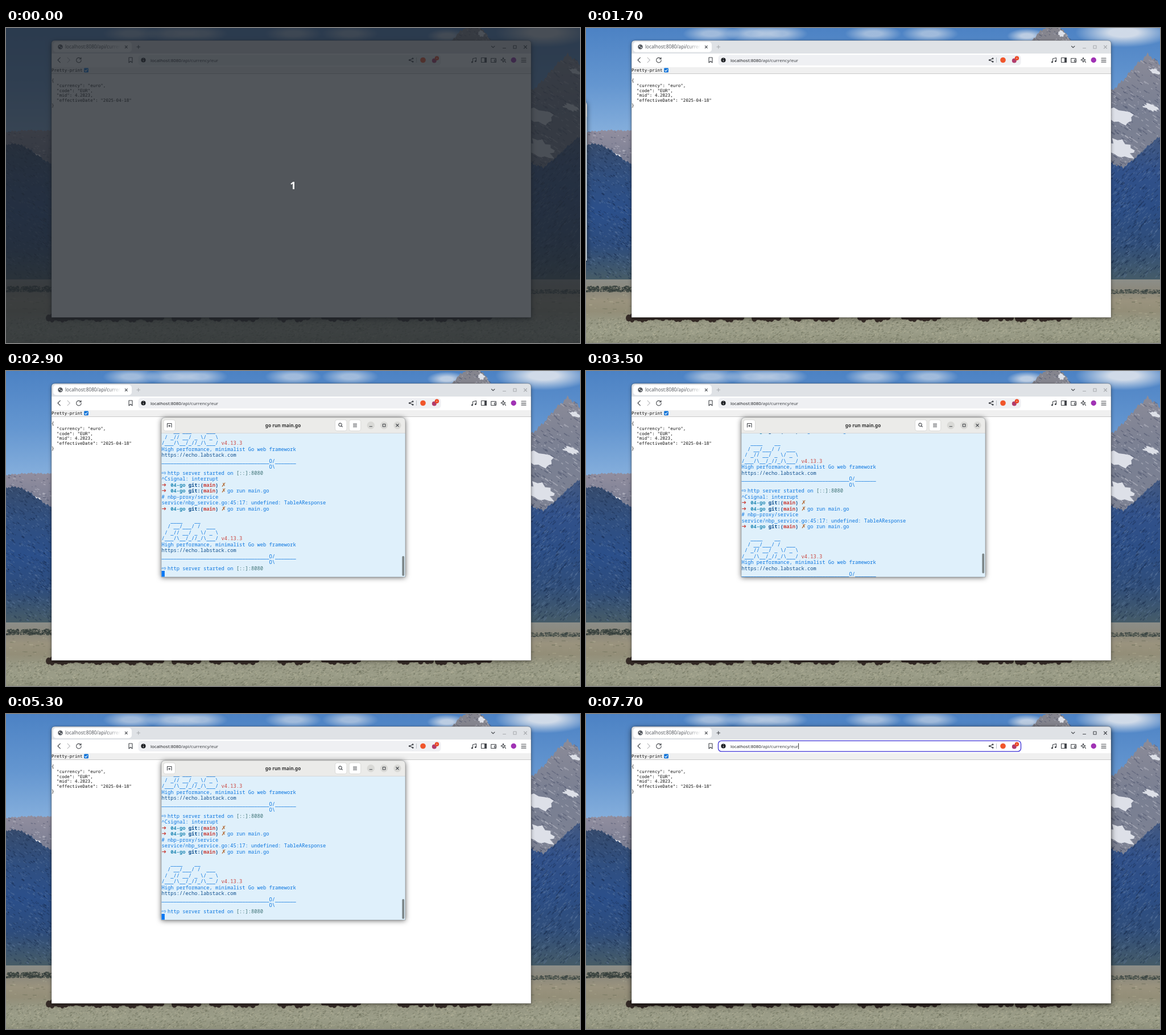
An HTML page with a canvas for the animation above (8000 ms loop, 1009 by 555 pixels).

```html
<!DOCTYPE html>
<html lang="en">
<head>
<meta charset="utf-8">
<title>Currency API demo</title>
<style>
html, body { margin: 0; width: 100%; height: 100%; overflow: hidden; background: #5a8cc9; }
canvas, svg { position: absolute; left: 0; top: 0; }
text { white-space: pre; }
.ui { font: 7.95px "Noto Sans", "Open Sans", sans-serif; }
.big { font-size: 8.2px; }
.json { font: 7.55px "DejaVu Sans Mono", monospace; fill: #111; }
.line path { fill: none; stroke: #44474c; stroke-width: 1.1; stroke-linecap: round; stroke-linejoin: round; }
#rows text { font: 8.75px "Noto Sans Mono", "DejaVu Sans Mono", monospace; fill: #0b76e0; }
#rows .b { font-weight: 700; }
#rows .w { font: 10px "DejaVu Sans", sans-serif; }
#rows .r { fill: #c9403a; }
#rows .c { fill: #2288b4; }
#rows .n { fill: #0f4f8f; }
#rows .o { fill: #b0622a; }
#rows .g { fill: #3f7377; }
#rows .sel * { fill: #dff0fb; }
#idle { filter: drop-shadow(0 2px 3px rgba(0,0,0,.4)); }
#lit { filter: drop-shadow(0 3px 6px rgba(0,0,0,.4)); }
#frame { filter: drop-shadow(0 1px 5px rgba(0,0,0,.6)); }
</style>
</head>
<body>
<canvas id="land" width="1009" height="555"></canvas>
<svg width="1009" height="555" viewBox="0 0 1009 555">
  <defs>
    <linearGradient id="fade" gradientUnits="userSpaceOnUse" x1="178" x2="202" y1="0" y2="0">
      <stop stop-color="#55595f"/><stop offset="1" stop-color="#55595f" stop-opacity="0"/>
    </linearGradient>
    <clipPath id="body"><rect y="28" width="429" height="253"/></clipPath>
    <path id="shell" d="M80 510V28q0-6 6-6H917q6 0 6 6V510z"/>
    <path id="pane" d="M0 281V7q0-7 7-7H422q7 0 7 7V281z"/>
  </defs>

  <use id="idle" href="#shell" fill="#dfe2e6"/>
  <use id="lit" href="#shell" fill="#dfe2e6"/>
  <rect x="80" y="45" width="843" height="465" fill="#fff"/>
  <rect x="83" y="24.5" width="138" height="18" rx="5" fill="#fff"/>
  <text class="ui big" x="104" y="36.3" fill="url(#fade)">localhost:8080/api/curren</text>
  <rect id="bar" x="232.5" y="47.3" width="532" height="18.7" rx="5.5" stroke-width="1.6"/>
  <rect id="mark" x="254" y="51" width="120" height="11" fill="#b5d1f7"/>
  <text class="ui" x="254" y="59.5" fill="#202226">localhost:8080<tspan fill="#3f4247">/api/currency/eur</tspan></text>
  <path id="caret" d="M373.6 51.5v10.300" stroke="#222" stroke-width=".9"/>
  <path d="M721.5 52v9" stroke="#bbbec4"/>
  <g id="icons" class="line"></g>
  <g id="controls" class="line"></g>
  <rect x="80" y="69" width="843" height="11.5" fill="#f0f0f0"/>
  <path d="M80 80.5h843" stroke="#c9c9c9"/>
  <text class="json" x="80" y="77">Pretty-print</text>
  <rect x="137.2" y="70.6" width="7.7" height="7.7" rx="1.3" fill="#0b72d8"/>
  <path d="M138.7 74.5l1.7 1.8 3-3.800" fill="none" stroke="#fff" stroke-width="1.1"/>
  <g id="json" class="json"></g>
  <use href="#shell" fill="none" stroke="#000" stroke-opacity=".28" stroke-width=".8"/>

  <g id="term">
    <use id="frame" href="#pane" fill="#dff0fb"/>
    <path d="M0 27.5V7q0-7 7-7H422q7 0 7 7V27.5z" fill="#ebebe9"/>
    <path d="M0 27.5h429" stroke="#d2d4d3" stroke-width=".8"/>
    <g id="buttons" class="line"></g>
    <text class="ui big" x="214" y="16.8" text-anchor="middle" fill="#333" font-weight="700" style="font-weight:700">go run main.go</text>
    <g clip-path="url(#body)">
      <g id="scroll">
        <path id="pick" fill="#00f"/>
        <g id="rows"></g>
        <rect id="block" x=".5" y="270" width="5.4" height="10.5" fill="#0878f4"/>
      </g>
    </g>
    <rect id="thumb" x="423.3" width="3.8" height="35" rx="1.8" fill="#7d8789"/>
    <use href="#pane" fill="none" stroke="#000" stroke-opacity=".3" stroke-width=".7"/>
  </g>

  <g id="count">
    <rect width="1009" height="555" fill="#22272d" fill-opacity=".78"/>
    <text x="504.5" y="283.9" text-anchor="middle" fill="#fff" style="font:600 18.5px 'Noto Sans',sans-serif">1</text>
  </g>
</svg>
<script>
const $ = id => document.getElementById(id);
const show = (id, on) => $(id).style.display = on ? '' : 'none';
const clamp = (v, lo, hi) => Math.min(hi, Math.max(lo, v));

// Landscape
const g = $('land').getContext('2d');
let seed = 7;
const rnd = () => (seed = seed * 16807 % 2147483647) / 2147483647;

function grad(y0, y1, ...colors) {
  const c = g.createLinearGradient(0, y0, 0, y1);
  colors.forEach((k, i) => c.addColorStop(i / (colors.length - 1), k));
  return c;
}
function band(y, h, fill) { g.fillStyle = fill; g.fillRect(0, y, 1009, h); }

function cloud(x, y, rx, ry, a) {
  g.save();
  g.translate(x, y);
  g.scale(rx, ry);
  const c = g.createRadialGradient(0, 0, .3, 0, 0, 1);
  c.addColorStop(0, `rgba(215,223,234,${a})`);
  c.addColorStop(1, 'rgba(215,223,234,0)');
  g.fillStyle = c;
  g.fillRect(-1, -1, 2, 2);
  g.restore();
}

// Ridge through evenly spaced heights, filled down to base; returns its height function
function range(x0, x1, heights, rough, base, fill) {
  const top = x => {
    const u = clamp((x - x0) / (x1 - x0), 0, .999) * (heights.length - 1), i = Math.floor(u);
    return heights[i] + (heights[i + 1] - heights[i]) * (u - i) + rough * (Math.sin(x * .4) + Math.sin(x * 1.1));
  };
  g.fillStyle = fill;
  for (let x = x0; x < x1; x++) g.fillRect(x, top(x), 1, base - top(x));
  return top;
}

// Short strokes between top(x) and bottom, leaning by slope
function specks(n, x0, x1, top, bottom, length, slope, ...colors) {
  for (let i = 0; i < n; i++) {
    const x = x0 + rnd() * (x1 - x0), y = top(x) + rnd() * (bottom - top(x)), d = 1 + rnd() * length;
    g.strokeStyle = colors[i % colors.length];
    g.lineWidth = 1 + rnd();
    g.beginPath();
    g.moveTo(x, y);
    g.lineTo(x + d, y + d * slope);
    g.stroke();
  }
}

function snow(x, y, rx, ry) {
  g.fillStyle = '#dde0e8';
  g.beginPath();
  for (let a = 0; a < 6.28; a += .3) {
    const r = .55 + rnd() * .5;
    g.lineTo(x + rx * r * Math.cos(a), y + ry * r * Math.sin(a) + rx * r * Math.cos(a) * .25);
  }
  g.fill();
}

function landscape() {
  const flat = y => () => y;
  const rockTones = ['rgba(205,206,216,.4)', 'rgba(62,70,98,.4)'];
  const treeTones = ['rgba(20,38,70,.35)', 'rgba(105,132,168,.3)'];
  const grassTones = ['rgba(192,190,162,.35)', 'rgba(88,92,72,.3)'];

  band(0, 555, grad(0, 200, '#4c82c4', '#6496d0', '#8bb3de'));
  for (const x of [220, 295, 340, 505, 605]) cloud(x, 10, 50, 15, .6);
  cloud(775, 14, 35, 13, .8);
  cloud(945, 8, 85, 26, .95);

  const peak = range(783, 851, [22, 7, -3, -4, 2, 22], 1, 23, '#85858e');
  specks(60, 783, 851, peak, 22, 4, .6, ...rockTones);
  snow(835, 10, 8, 6);

  const far = range(0, 80, [183, 180, 181], .7, 260, grad(180, 240, '#918e9f', '#797d92'));
  specks(90, 0, 80, far, 235, 4, .3, ...rockTones);
  snow(48, 223, 15, 5);
  const near = range(0, 80, [205, 204, 213, 228, 241], 1, 443, grad(205, 443, '#364b6d', '#304f80', '#2b4f8a', '#2d4c7c', '#475c66'));
  specks(600, 0, 80, near, 440, 4, .7, ...treeTones);

  const crag = range(922, 1009, [112, 92, 66, 46, 64], 1.500, 260, grad(45, 240, '#8b8b98', '#797f92', '#7d8293'));
  specks(260, 922, 1009, crag, 240, 7, .7, ...rockTones);
  for (const y of [156, 214]) snow(940, y, 30, 18);
  snow(999, 76, 12, 5);
  snow(992, 140, 15, 7);
  const slope = range(922, 1009, [238, 246, 229, 208, 190], 1, 443, grad(190, 443, '#425880', '#31518a', '#2c4e86', '#304e7a', '#455b68'));
  specks(650, 922, 1009, slope, 440, 5, -1, ...treeTones);

  band(443, 112, grad(443, 555, '#8c8e89', '#8b887c', '#9a937e', '#938e78', '#979884', '#9b9d88', '#8f917c'));
  specks(330, 0, 80, flat(455), 465, 3, 0, '#333c3a', '#48514a');
  specks(200, 922, 1009, flat(461), 468, 3, 0, '#3a4442', '#596057');
  specks(500, 0, 1009, flat(470), 510, 6, 0, ...grassTones);
  specks(3600, 0, 1009, flat(511), 555, 3, -.4, ...grassTones);

  // herd
  g.fillStyle = '#352b27';
  for (const [a, b] of [[72, 272], [293, 338], [359, 438], [479, 533], [556, 620], [690, 748], [756, 850]])
    for (let x = a; x < b; x += 6) {
      g.beginPath();
      g.ellipse(x + 3, 511, 5, 2 + rnd() * 6, 0, 0, 7);
      g.fill();
    }
}

// Icon pieces
const path = d => `<path d="${d}"/>`;
const cross = (x, y, r) => path(`M${x - r} ${y - r}l${2 * r} ${2 * r}m0 ${-2 * r}l${-2 * r} ${2 * r}`);
const dash = (x, y, w) => path(`M${x - w / 2} ${y}h${w}`);
const box = (x, y, w, h = w) => path(`M${x - w / 2} ${y - h / 2}h${w}v${h}h${-w}z`);
const side = (x, y, r) => path(`M${x - r / 2} ${y - Math.abs(r)}l${r} ${Math.abs(r)} ${-r} ${Math.abs(r)}`);
const menu = (x, y, w, gap) => [-gap, 0, gap].map(d => dash(x, y + d, w)).join('');
const dot = (x, y, r, fill = '#44474c') => `<circle cx="${x}" cy="${y}" r="${r}" fill="${fill}"/>`;
const key = x => `<rect x="${x - 10.3}" y="4" width="20.5" height="19.5" rx="3.5" fill="#fff" stroke="#cfcfcc" stroke-width=".7"/>`;

$('icons').innerHTML = [
  dot(95.5, 33.3, 4.2, '#55595f'), dot(94.2, 32.2, 1, '#fff'), dot(97, 34.5, 1, '#fff'),
  cross(211.3, 33.3, 2), path('M853.5 32l2.7 2.700 2.700-2.700'),
  side(93.2, 56.5, -4.3), `<g opacity=".35">${side(110.2, 56.5, 4.3)}</g>`,
  path('M131 53.7a4.300 4.300 0 1 0 1.200 3M132 52v2.700h-2.700'), path('M216 52h6v9l-3-2.500-3 2.500z'),
  dot(241.5, 56.5, 4.1, '#202226'), dot(241.5, 54.6, .5, '#fff'), dot(241.5, 57.6, .8, '#fff'),
  path('M715 53.800l-5.500 2.700 5.500 2.700'), dot(715, 53.7, 1.5), dot(709.3, 56.5, 1.5), dot(715, 59.3, 1.5),
  dot(733, 56.5, 4.8, '#f0562c'), dot(752.8, 57.5, 4, '#b03c6c'), dot(757.4, 53.3, 3.7, '#ec4a28'), dot(757.4, 53.3, .8, '#fff'),
  path('M820.5 60v-6l6-1.500v6'), dot(819.3, 60, 1.5), dot(825.3, 58.5, 1.5),
  box(840, 56.5, 9, 8), `<rect x="841" y="52.5" width="3.5" height="8" fill="#44474c"/>`,
  box(857, 57, 8.5, 7), box(860, 57.5, 3),
  path('M874 52l1 3 3 1.200-3 1.200-1 3-1-3-3-1.200 3-1.200zM876.500 58.500l2 2'),
  dot(892.3, 56.5, 4.7, '#a032b4'), menu(910, 56.6, 8, 3.3)
].join('');
$('controls').innerHTML = dash(232.8, 33.3, 5.6) + path('M232.8 30.500v5.600') + dash(876, 35.5, 5) + box(894.5, 33.5, 5) + cross(913, 33.5, 2.5);
$('buttons').innerHTML = [14.3, 315.8, 340.5].map(key).join('') + [368.3, 391.6, 415].map(x => dot(x, 13.7, 6.7, '#d9d9d6')).join('') +
  path('M10.500 17v-6.500h7.500V17') + dash(14.2, 14.8, 3) + path('M14.200 13.300v3') +
  path('M318.300 16.300l-1.800-1.800a2.700 2.700 0 1 0-.1 .1') + menu(340.5, 13.7, 6, 2.5) +
  dash(368.3, 15.8, 4.5) + box(391.6, 13.7, 4.5) + cross(415, 13.7, 2.2);

// Page and terminal text
const json = ['{', '  "currency": "euro",', '  "code": "EUR",', '  "mid": 4.2823,', '  "effectiveDate": "2025-04-18"', '}'];
const prompt = cmd => [[0, 'r w', '➜'], [3, 'c b', '04-go'], [9, 'n b', 'git:('], [14, 'r b', 'main'], [18, 'n b', ')'], [20, 'o w', '✗'], [22, '', cmd]];
const plain = s => [[0, '', s]];
const ready = [[0, 'w', '⇨'], [2, '', 'http server started on'], [25, 'g', '[::]:8080']];
const banner = [
  [], plain('   ____    __'), plain('  / __/___/ /  ___'), plain(String.raw` / _// __/ _ \/ _ \ `),
  [[0, '', String.raw`/___/\__/_//_/\___/`], [20, 'r', 'v4.13.3']],
  plain('High performance, minimalist Go web framework'),
  [[0, 'n', 'https://echo.labstack.com']],
  plain('_'.repeat(36) + 'O/_______'), [[36, '', 'O\\']], ready
];
const run = prompt('go run main.go');
const stop = plain('^Csignal: interrupt');
const rows = [
  ready, stop, run, ...banner, stop, prompt(''), run,
  plain('# nbp-proxy/service'), plain('service/nbp_service.go:45:17: undefined: TableAResponse'),
  run, ...banner
];
const CELL = 5.25, PITCH = 10.5, ABOVE = 6, LAST = 23;
const rowTop = r => 29.2 + PITCH * r;

$('json').innerHTML = json.map((s, i) => `<text x="80" y="${95 + 8.75 * i}">${s}</text>`).join('');
$('rows').innerHTML = rows.map((runs, i) => '<g>' + runs.map(([col, cls, s]) =>
  `<text class="${cls}" x="${.6 + CELL * col}" y="${rowTop(i - ABOVE) + 8.3}">${s}</text>`).join('') + '</g>').join('');
const rowEls = [...$('rows').children];
const link = rowEls[19 + ABOVE].firstChild;

// Number of 100 ms steps begun since t0, at most max
const steps = (t, t0, max) => clamp(Math.floor((t - t0) / 100) + 1, 0, max);

// Dragged in along a dipping arc, dropped, later dragged out to a screen of lower density
function pose(t) {
  if (t < 1700 || t >= 6700) return null;
  if (t < 2500) {
    const p = (steps(t, 1800, 1) + steps(t, 2000, 2)) / 3;
    const e = 1 - (1 - p) ** 2.26;
    return [-427.5 + 705.5 * e, 129 - 51 * e + 80 * Math.sin(Math.PI * e), 1];
  }
  const p = steps(t, 6400, 3) / 3;
  return [273 - 400.5 * p, 82 + 18 * p, p < 1 ? 1 : .758];
}

function draw(t) {
  const focus = t < 500 ? 1 : steps(t, 6900, 3) / 3;
  show('count', t < 100);
  $('lit').style.opacity = focus;
  $('controls').style.opacity = .35 + .65 * focus;
  const editing = t >= 7400;
  $('bar').setAttribute('fill', editing ? '#fff' : '#eff0f3');
  $('bar').setAttribute('stroke', editing ? '#5a50dc' : 'none');
  show('mark', editing && t < 7700);
  show('caret', t >= 7700);

  const at = pose(t);
  show('term', at);
  if (!at) return;
  $('term').setAttribute('transform', `translate(${at[0]} ${at[1]}) scale(${at[2]})`);
  const up = 3 * (steps(t, 3200, 2) - steps(t, 3500, 2));
  $('scroll').setAttribute('transform', `translate(0 ${up * PITCH})`);
  $('thumb').setAttribute('y', 244 - up * 1.46);
  $('thumb').style.opacity = t < 6400 ? 1 : .2;
  show('block', Math.floor((t + 100) / 600) % 2);
  link.style.textDecoration = t >= 3600 && t < 3900 ? 'underline' : 'none';

  // Selection grows upwards from the end of the last line
  const n = t < 5200 ? steps(t, 4500, 5) : 0;
  const row = n ? Math.round(24.25 - 2.25 * n) : LAST, left = n === 1 ? .5 + 34 * CELL : .5;
  $('pick').setAttribute('d', n ? `M${left} ${rowTop(row)}H420.5V${rowTop(LAST)}H${left}z` : '');
  rowEls.forEach((el, i) => el.classList.toggle('sel', n > 1 && i - ABOVE >= row));
}

landscape();
const start = performance.now();
(function tick() {
  draw((performance.now() - start) % 8000);
  requestAnimationFrame(tick);
})();
</script>
</body>
</html>
```
